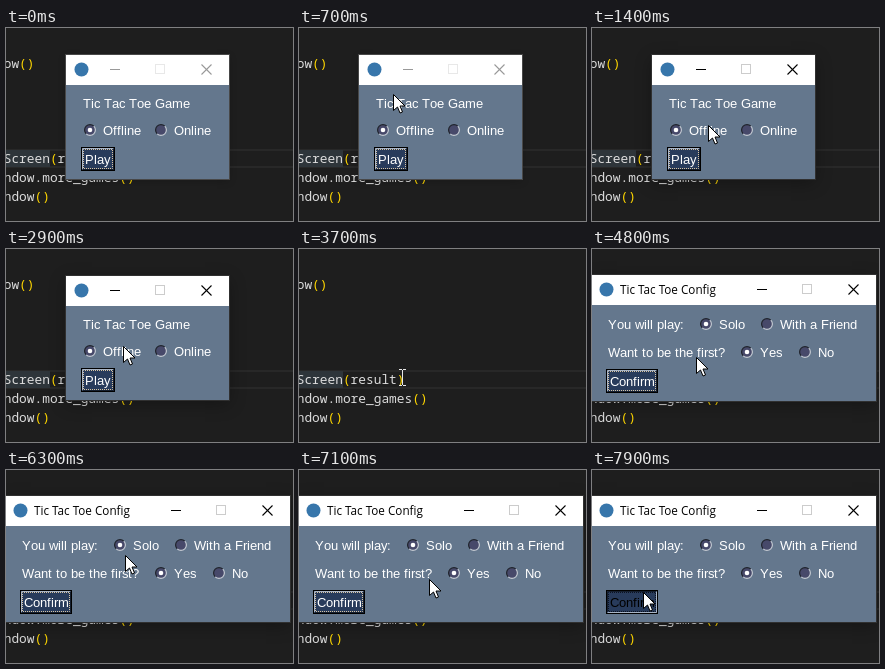
These frames come from a looping animation (287 by 193 pixels, 8000 ms). An HTML page with a canvas:

```html
<!DOCTYPE html>
<html lang="en">
<head>
<meta charset="utf-8">
<title>Tic Tac Toe launcher</title>
<style>
html, body { margin: 0; width: 100%; height: 100%; overflow: hidden; background: #1e1e1e; }
canvas { display: block; width: 287px; height: 193px; }
</style>
</head>
<body>
<canvas id="stage" width="287" height="193"></canvas>
<script>
const ctx = document.getElementById('stage').getContext('2d');
const LOOP = 8000, STEP = 100;
const CODE_FONT = '12.83px "Noto Sans Mono", monospace';
const UI_FONT = '13px "Liberation Sans", Arial, sans-serif';
const TITLE_FONT = '11.7px "Open Sans", sans-serif';
const ADVANCE = 7.7;

// Pointer stops: time, x, y of the hot spot
const POINTER = [
  [100, 24, -24], [1000, 119, 97], [1400, 116, 97], [1500, 116, 97],
  [2000, 117, 98], [2900, 117, 97], [3000, 112, 109], [3400, 103, 128],
  [4100, 103, 128], [4300, 110, 125], [4800, 104, 108], [4900, 104, 108],
  [5000, 104, 109], [5200, 104, 109], [6100, 119, 79], [6200, 119, 79],
  [6300, 119, 85], [6700, 157, 105], [6800, 157, 105], [7700, 51, 122]
];

const launcher = {
  x: 60, y: 27, w: 163, h: 124, title: '',
  labels: [['Tic Tac Toe Game', 77, 80], ['Offline', 97, 107], ['Online', 168, 107]],
  radios: [[84, 102, true], [155, 102, false]],
  button: { text: 'Play', x: 75, y: 119, w: 34, h: 24 }
};
const config = {
  x: -1, y: 26, w: 285, h: 126, title: 'Tic Tac Toe Config',
  labels: [['You will play:', 16, 80], ['Solo', 127, 80], ['With a Friend', 188, 80],
           ['Want to be the first?', 16, 108], ['Yes', 168, 108], ['No', 226, 108]],
  radios: [[114, 75, true], [175, 75, false], [155, 103, true], [213, 103, false]],
  button: { text: 'Confirm', x: 14, y: 120, w: 52, h: 24 }
};

const clamp = v => Math.max(0, Math.min(1, v));
const ease = v => v * v * (3 - 2 * v);

function rect(x, y, w, h, color) {
  ctx.fillStyle = color;
  ctx.fillRect(x, y, w, h);
}

function frame(x, y, w, h, color) {
  ctx.strokeStyle = color;
  ctx.lineWidth = 1;
  ctx.strokeRect(x + 0.5, y + 0.5, w - 1, h - 1);
}

function text(str, x, y, font, color) {
  ctx.font = font;
  ctx.fillStyle = color;
  ctx.fillText(str, x, y);
}

// Widget text sits on whole pixels, one glyph at a time
function uiText(str, x, y, color) {
  for (const ch of str) {
    text(ch, x, y, UI_FONT, color);
    x += Math.round(ctx.measureText(ch).width - 0.1);
  }
}

function line(points, color, width = 1) {
  ctx.strokeStyle = color;
  ctx.lineWidth = width;
  ctx.beginPath();
  points.forEach(([x, y]) => ctx.lineTo(x, y));
  ctx.stroke();
}

function arc(x, y, r, from, to, color) {
  ctx.strokeStyle = color;
  ctx.lineWidth = 1.2;
  ctx.beginPath();
  ctx.arc(x, y, r, from * Math.PI, to * Math.PI);
  ctx.stroke();
}

function disc(x, y, r, color) {
  ctx.fillStyle = color;
  ctx.beginPath();
  ctx.arc(x, y, r, 0, 7);
  ctx.fill();
}

function codeLine(str, y) {
  [...str].forEach((ch, i) =>
    text(ch, -2.3 + i * ADVANCE, y, CODE_FONT, '()'.includes(ch) ? '#ffd700' : '#dcdcdc'));
}

function drawEditor() {
  rect(0, 0, 287, 193, '#1e1e1e');
  rect(0, 121, 287, 2, '#282828');
  rect(0, 138, 287, 2, '#282828');
  rect(0, 122, 44, 17, '#2e353a');
  codeLine('ow()', 40);
  codeLine('Screen(result)', 135);
  codeLine('ndow.more_games()', 154);
  codeLine('ndow()', 173);
}

function drawRadio([x, y, selected]) {
  disc(x, y, 5.5, '#47496a');
  arc(x, y, 5.4, 0.75, 1.75, '#20242c');
  arc(x, y, 5.4, -0.25, 0.75, '#c3cad2');
  if (selected) disc(x, y, 2.3, '#fff');
}

function drawButton({ text: label, x, y, w, h }, pressed) {
  const light = '#a9b5c6', dark = '#141e2e';
  rect(x, y, w, h, '#283b5b');
  frame(x, y, w, h, '#000');
  const left = x + 1.5, top = y + 1.5, right = x + w - 1.5, bottom = y + h - 1.5;
  line([[left, bottom], [left, top], [right, top]], pressed ? dark : light);
  line([[left, bottom], [right, bottom], [right, top]], pressed ? light : dark);
  ctx.setLineDash([1, 1]);
  ctx.lineDashOffset = 0.5;
  frame(x + 2, y + 2, w - 4, h - 4, pressed ? '#0c1220' : '#d7c4a4');
  ctx.setLineDash([]);
  uiText(label, x + 4, y + 17, pressed ? '#000' : '#fff');
}

function drawWindow(win, active, pressed, opacity = 1) {
  const { x, y, w, h } = win, right = x + w, mid = y + 14.5;
  const ink = active ? '#000' : '#999';
  ctx.save();
  ctx.globalAlpha = opacity;
  ctx.shadowColor = `rgba(0,0,0,${active ? 0.3 : 0.2})`;
  ctx.shadowBlur = active ? 16 : 8;
  ctx.shadowOffsetY = active ? 4 : 2;
  rect(x, y, w, h, '#64778d');
  ctx.shadowColor = 'transparent';
  frame(x - 1, y - 1, w + 2, h + 2, active ? '#303030' : '#484848');
  rect(x, y, w, 30, '#fff');
  disc(x + 15.5, mid, 7, '#3776ab');
  text(win.title, x + 29, y + 19, TITLE_FONT, '#000');
  line([[right - 119, mid], [right - 109, mid]], ink);
  frame(right - 74, mid - 5.5, 10, 10, active ? '#ccc' : '#e8e8e8');
  line([[right - 27.5, mid - 5], [right - 17.5, mid + 5]], ink, 1.1);
  line([[right - 27.5, mid + 5], [right - 17.5, mid - 5]], ink, 1.1);
  win.labels.forEach(([str, tx, ty]) => uiText(str, tx, ty, '#fff'));
  win.radios.forEach(drawRadio);
  drawButton(win.button, pressed);
  ctx.restore();
}

function pointerAt(t) {
  const next = POINTER.findIndex(stop => stop[0] > t);
  if (next === 0) return POINTER[0].slice(1);
  if (next < 0) return POINTER[POINTER.length - 1].slice(1);
  const [t0, x0, y0] = POINTER[next - 1], [t1, x1, y1] = POINTER[next];
  const k = ease((t - t0) / (t1 - t0));
  return [Math.round(x0 + (x1 - x0) * k), Math.round(y0 + (y1 - y0) * k)];
}

function drawArrow(x, y) {
  const shape = [[0, 0], [0, 16], [4, 12.5], [6.5, 18.5], [9, 17.5], [6.5, 11.5], [11.5, 11.5]];
  ctx.beginPath();
  shape.forEach(([dx, dy]) => ctx.lineTo(x + 0.5 + dx, y + 0.5 + dy));
  ctx.closePath();
  ctx.fillStyle = '#fff';
  ctx.fill();
  ctx.strokeStyle = '#000';
  ctx.lineWidth = 1;
  ctx.stroke();
}

function drawBeam(x, y) {
  rect(x, y - 7, 1, 15, '#e8e8e8');
  for (const dy of [-8, 8]) {
    rect(x - 3, y + dy, 3, 1, '#e8e8e8');
    rect(x + 1, y + dy, 3, 1, '#e8e8e8');
  }
}

function draw(t) {
  drawEditor();
  let open = null;
  if (t < 3600) {
    open = launcher;
    drawWindow(launcher, t >= 1100, t >= 3400);
  } else if (t >= 3800) {
    open = config;
    drawWindow(config, true, t >= 7900, clamp((t - 3700) / 300));
  }
  const [x, y] = pointerAt(t);
  const inside = open && x >= open.x && x < open.x + open.w && y >= open.y && y < open.y + open.h;
  (inside ? drawArrow : drawBeam)(x, y);
}

const start = performance.now();
function tick() {
  const t = (performance.now() - start) % LOOP;
  draw(Math.floor(t / STEP) * STEP);
  requestAnimationFrame(tick);
}
tick();
</script>
</body>
</html>
```
